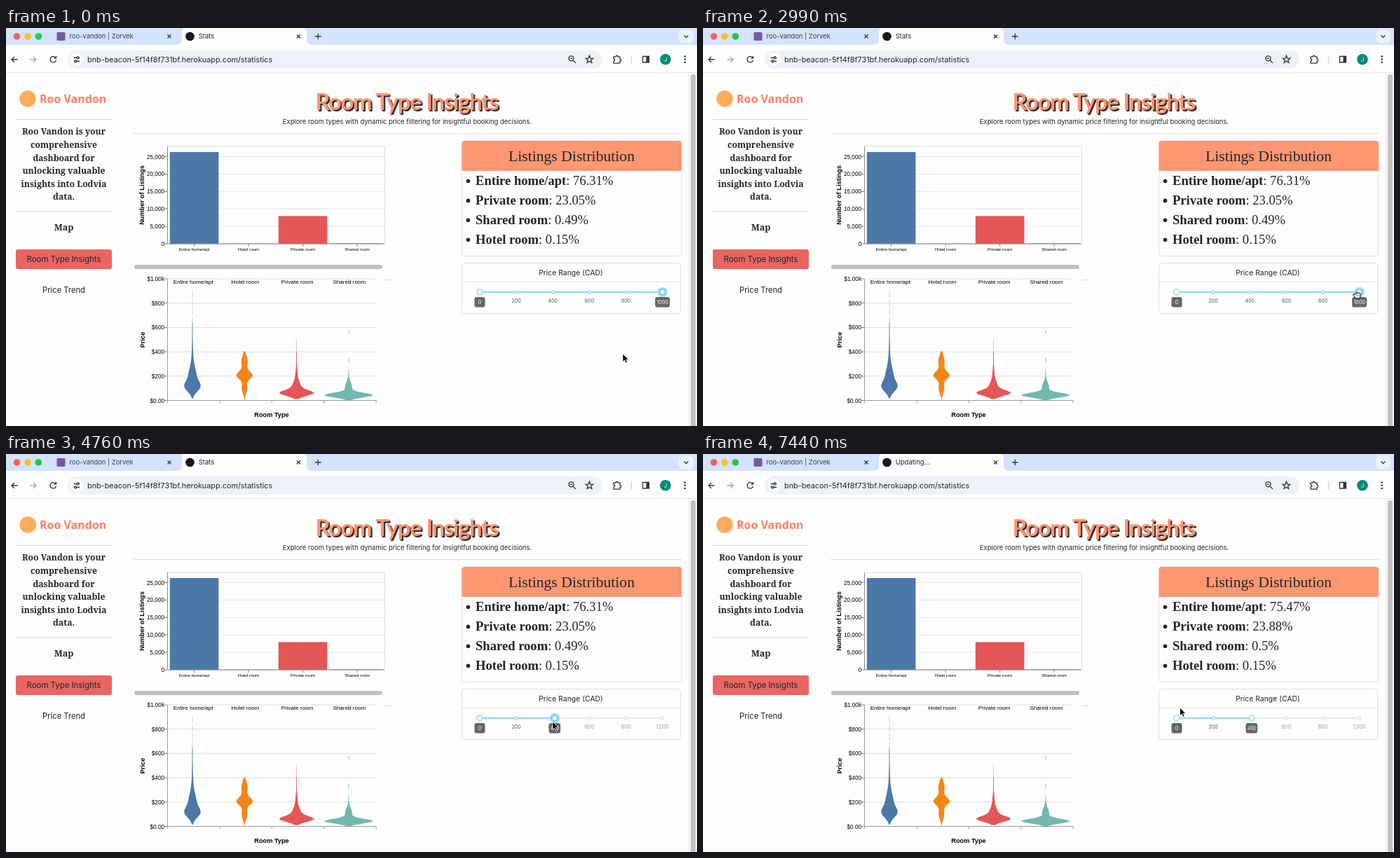
An HTML page that plays this animation: 986x568 px, repeating every 8000 ms.

```html
<!DOCTYPE html>
<html lang="en">
<head>
<meta charset="utf-8">
<title>Stats</title>
<style>
html, body { margin: 0; height: 100%; overflow: hidden; background: #fdfdfd; }
svg { display: block; width: 100%; height: 100%; font-family: Inter, sans-serif; fill: #212529; }
.arial { font-family: "Liberation Sans", Arial, sans-serif; fill: #000; }
.times { font-family: "Liberation Serif", "Times New Roman", serif; }
.slab { font-family: "Noto Serif", serif; font-weight: 600; }
.brand { font-family: "Open Sans", sans-serif; font-weight: 700; fill: #ff7f66; }
.title { font-family: Lato, sans-serif; font-weight: 700; fill: #ff9472; letter-spacing: -1.1px; text-shadow: 2px 2px 1px #222; }
.bold { font-weight: 700; }
.white { fill: #fff; }
.icon { fill: none; stroke: #333; stroke-width: 1.3; }
.hand { fill: #fff; stroke: #000; stroke-linejoin: round; }
</style>
</head>
<body>
<svg id="stage" viewBox="0 0 986 568"></svg>
<script>
const BLUE = '#4c78a8', ORANGE = '#f58518', RED = '#e45756', TEAL = '#72b7b2', SKY = '#96dbfa';
const rooms = ['Entire home/apt', 'Hotel room', 'Private room', 'Shared room'];

const text = (x, y, size, str, cls = '', anchor = 'middle', extra = '') =>
  `<text x="${x}" y="${y}" font-size="${size}" class="${cls}" text-anchor="${anchor}" ${extra}>${str}</text>`;
const upright = (x, y, size, str) =>
  text(0, 0, size, str, 'arial bold', 'middle', `transform="translate(${x} ${y}) rotate(-90)"`);
const rect = (x, y, w, h, fill, r = 0, extra = '') =>
  `<rect x="${x}" y="${y}" width="${w}" height="${h}" rx="${r}" fill="${fill}" ${extra}/>`;
const circle = (x, y, r, fill, extra = '') => `<circle cx="${x}" cy="${y}" r="${r}" fill="${fill}" ${extra}/>`;
const line = (d, color = '#ddd', width = 1, extra = '') =>
  `<path d="${d}" fill="none" stroke="${color}" stroke-width="${width}" ${extra}/>`;
const icon = (d, color = '#333') => `<path class="icon" d="${d}" style="stroke:${color}"/>`;
const repeat = (n, draw) => Array.from({ length: n }, (_, i) => draw(i)).join('');

function browser() {
  const close = x => icon(`M${x - 2.5} 9.5l5 5m0-5l-5 5`);
  const star = repeat(10, i => {
    const r = i % 2 ? 2.4 : 5.6, a = (i / 5 - .5) * Math.PI;
    return `${i ? 'L' : 'M'}${832.5 + r * Math.cos(a)} ${45 + r * Math.sin(a)}`;
  });
  return rect(0, 0, 986, 24, '#d3e3fd') +
    ['#fe5f57', '#febc2e', '#28c840'].map((c, i) => circle(15.5 + i * 15.4, 12, 4.8, c)).join('') +
    '<path d="M243 24q8 0 8-8V6q0-6 6-6H423q6 0 6 6V16q0 8 8 8z" fill="#fdfdfd"/>' +
    rect(72.5, 6, 12, 12, '#79589f', 1.5) + text(90.5, 15.2, 9.4, 'roo-vandon | Zorvek', '', 'start', 'opacity=".85"') +
    circle(262.5, 12, 6.3, '#17171c') + text(274.7, 15.2, 9.5, '', '', 'start', 'id="tab"') +
    close(233) + close(417.5) + icon('M441 12h8.5m-4.2-4.2v8.5') +
    rect(960, 2, 21, 20, '#ebf2fe', 7) + icon('M967.5 10.5l3 3 3-3') +
    line('M0 63.5H986', '#e0e4ea') +
    icon('M16.5 45H8m4-4l-4 4 4 4') + icon('M34.5 45H43m-4-4l4 4-4 4', '#a5a8ad') +
    icon('M71 42.5a4.3 4.3 0 1 0 .5 3.5M71.5 40v3.2h-3.2') +
    rect(88, 32, 763, 25.5, '#edf1fa', 12.7) + circle(101, 45, 9, '#fdfdfd') +
    icon('M96.500 42.5h4.500m3 0h1M96.500 47.5h1m3 0h4.500') +
    circle(102.7, 42.5, 1.5, 'none', 'class="icon"') + circle(99.3, 47.5, 1.5, 'none', 'class="icon"') +
    text(116, 49, 10.85, 'bnb-beacon-5f14f8f731bf.herokuapp.com/statistics', '', 'start') +
    circle(806.5, 43.3, 3.5, 'none', 'class="icon"') + icon('M809 46l4 4M804.8 43.3h3.4') + icon(star + 'z') +
    icon('M867 41.2h3a1.7 1.7 0 0 1 3.4 0h2.6v3a1.7 1.7 0 0 1 0 3.4v2.6h-9v-3a1.7 1.7 0 0 0 0-3.4z') +
    line('M892.5 39v12', '#c9dbf8', 1.5) + icon('M908.5 40.5h9v8.5h-9z') + rect(913.5, 40.5, 4.5, 8.5, '#333') +
    circle(941, 44.8, 7.8, '#00897b') + text(941, 47.8, 8, 'J', 'white') +
    repeat(3, i => circle(968.7, 40.6 + i * 4.2, 1.3, '#333')) +
    rect(974.5, 64, 12, 504, '#fafafa') + line('M974.5 64V568', '#e8e8e8') + rect(977, 66, 7, 520, '#c1c1c1', 3.5);
}

function sidebar() {
  const intro = ['Roo Vandon is your', 'comprehensive', 'dashboard for', 'unlocking valuable', 'insights into Lodvia', 'data.'];
  return circle(31, 101, 11.8, '#ffab5e') + text(48, 107, 16, 'Roo Vandon', 'brand', 'start') +
    line('M14 130.5H151M14 262H151', '#d5d5d5') +
    intro.map((s, i) => text(82.5, 152.3 + i * 18.6, 12.2, s, 'slab')).join('') +
    text(82.5, 289.3, 12.6, 'Map', 'slab') +
    rect(14, 316, 137, 28, '#ea6561', 3) + text(82.5, 334.3, 11.4, 'Room Type Insights') +
    text(82.5, 377.8, 11.2, 'Price Trend');
}

const heading = () => text(572, 116.5, 32.5, 'Room Type Insights', 'title') +
  text(572.5, 136.8, 9.45, 'Explore room types with dynamic price filtering for insightful booking decisions.') +
  line('M182 150.5H964');

function barChart() {
  const y = count => 308 - count * .00498;
  const bars = [[26300, BLUE], [50, ORANGE], [7950, RED], [170, TEAL]];
  return rect(230.5, 169, 310, 139, 'none', 0, 'stroke="#ddd"') +
    repeat(6, k => line(`M230 ${y(k * 5000)}H540`, '#e6e6e6') + line(`M226 ${y(k * 5000)}h4`, '#888') +
      text(226, y(k * 5000) + 3, 8.2, (k * 5000).toLocaleString('en-US'), 'arial', 'end')) +
    bars.map(([count, color], i) => {
      const x = 268.6 + i * 77.5;
      return rect(x - 34.8, y(count), 69.6, 308 - y(count), color) + line(`M${x} 308v4`, '#888') +
        text(x, 318, 6.2, rooms[i], 'arial');
    }).join('') +
    line('M230.5 169V308H540', '#888') + upright(197, 238.5, 9.3, 'Number of Listings') +
    rect(183, 338, 354, 6, '#c1c1c1', 3);
}

const priceY = price => 531.5 - price * .1735;

// Density as a sum of bumps: [half-width, price, spread].
function violin(cx, color, low, high, bumps) {
  const half = p => bumps.reduce((sum, [a, m, s]) => sum + a * Math.exp(-(((p - m) / s) ** 2)), 0);
  let right = '', left = '';
  for (let p = low; p <= high; p += 4) {
    right += `${cx + half(p)},${priceY(p)} `;
    left = `${cx - half(p)},${priceY(p)} ` + left;
  }
  return `<polygon points="${right + left}" fill="${color}"/>`;
}

function violinChart() {
  const outliers = (x, from, to, color, opacity, dash = '') =>
    line(`M${x} ${priceY(from)}V${priceY(to)}`, color, 1, `opacity="${opacity}" stroke-dasharray="${dash}"`);
  return repeat(6, k => {
    const y = priceY(k * 200);
    return line(`M230 ${y}H528`) + line(`M226 ${y}h4`, '#888') +
      text(226, y + 3, 8.2, k < 5 ? '$' + (k * 200 || '0.00') : '$1.00k', 'arial', 'end');
  }) +
    repeat(5, i => line(`M${230.5 + i * 74.4} 531v4`, '#999')) + line('M230.5 358V531.5H528', '#999') +
    outliers(266, 640, 920, BLUE, .35, '9 3') + outliers(266, 400, 640, BLUE, .85) +
    violin(266, BLUE, 16, 560, [[9.5, 112, 60], [4.5, 200, 90], [1.5, 300, 150]]) +
    violin(340.3, ORANGE, 4, 406, [[11, 207, 45], [4.5, 320, 70], [4, 100, 60]]) +
    outliers(414.5, 400, 505, RED, .4) + outliers(414.5, 230, 400, RED, .9) +
    violin(414.5, RED, 12, 330, [[20, 60, 32], [6, 100, 65], [1.5, 200, 100]]) +
    outliers(489, 965, 1000, TEAL, .7) + outliers(489, 552, 578, TEAL, .9) + outliers(489, 180, 350, TEAL, .9, '13 10') +
    violin(488.8, TEAL, 3, 215, [[33, 43, 27], [5, 110, 60]]) +
    rooms.map((s, i) => text(267.2 + i * 74.2, 364.8, 8.1, s, 'arial')).join('') +
    text(379, 555, 9.2, 'Room Type', 'arial bold') + upright(198, 445, 9.2, 'Price') +
    repeat(3, i => circle(542 + i * 3.5, 359.5, 1, '#ccc'));
}

function cards() {
  const items = ['Entire home/apt', 'Private room', 'Shared room', 'Hotel room'];
  return rect(650.5, 161, 313.5, 164.5, 'none', 4, 'stroke="#dfdfdf"') +
    '<path d="M650.5 204V165q0-4 4-4H960q4 0 4 4V204z" fill="#ff9773"/>' +
    text(807, 189.5, 21.7, 'Listings Distribution', 'times') +
    items.map((s, i) => circle(659.5, 218.5 + i * 27.9, 2.8, '#212529') +
      text(670, 224 + i * 27.9, 18.6, `<tspan class="bold">${s}</tspan><tspan class="share"></tspan>`, 'times', 'start')).join('') +
    rect(650.5, 335.5, 312, 72, 'none', 4, 'stroke="#dfdfdf"') + line('M650.5 362.5H962.5', '#e2e2e2') +
    text(806, 353.4, 10.4, 'Price Range (CAD)');
}

const sliderX = value => 676 + value * .2607;

function tooltip(value) {
  const x = sliderX(value), w = value < 10 ? 15 : value < 1000 ? 16.5 : 21;
  return rect(x - w / 2, 384, w, 14.5, '#666', 3) + text(x, 393.9, 7.2, value, 'white');
}

function slider(value, focused) {
  const x = sliderX(value);
  const handle = (cx, color = SKY) => circle(cx, 377, 4, '#fff', `stroke="${color}" stroke-width="1.6"`);
  return line('M676 377H936.5', '#e9e9e9', 2.5) + line(`M676 377H${x}`, SKY, 2.5) +
    repeat(6, k => {
      const v = k * 200, on = v <= value;
      return circle(sliderX(v), 377, 2, '#fff', `stroke="${on ? SKY : '#e4e4e4'}" stroke-width="1.3"`) +
        text(sliderX(v), 391.9, 7.2, v.toLocaleString('en-US'), '', 'middle', `style="fill:${on ? '#555' : '#999'}"`);
    }) +
    handle(676) + (focused ? circle(x, 377, 7.3, '#a9e0fa') + handle(x, '#57c2f5') : handle(x)) +
    tooltip(0) + tooltip(value);
}

const hand = (fingers, palm) => '<g class="hand">' +
  `<path d="M-3 ${palm - 2}l-2.500-3q0-2 2.500-.5V${fingers + 1}a1 1 0 0 1 2 0v-1a1 1 0 0 1 2 0a1 1 0 0 1 2 .5a1 1 0 0 1 2 1V1l-1.500 ${palm - 1}h-5z"/>` +
  `<path d="M-1 ${fingers + 2}V0m2-1.500V0m2-1.500V0" stroke-width=".7"/></g>`;
const cursors = {
  arrow: '<path d="M0 0V11.5l2.7-2.4 1.9 4.2 2-.9-1.9-4.1H8.3z" fill="#000" stroke="#fff" stroke-width=".8"/>',
  open: hand(-5, 5),
  grab: hand(-3.5, 4)
};

const TICK = 148.5;
const easeIn = p => p ** 5;
const easeOut = p => 1 - (1 - p) ** 2.5;
const easeInOut = p => p * p * (3 - 2 * p);
const progress = (tick, from, to) => Math.min(1, Math.max(0, (tick - from) / (to - from)));
const mix = (a, b, p) => a + (b - a) * p;

const DRAG = [20, 31];
const moves = [
  { ticks: [2, 9], start: [880, 465], end: [935, 380], ease: easeInOut },
  { ticks: DRAG, start: [933, 382], end: [780, 382], ease: easeOut },
  { ticks: [36, 42], start: [780, 384], end: [683, 366], ease: easeIn },
  { ticks: [44, 50], start: [683, 366], end: [680.5, 362], ease: easeInOut }
];

function pointerAt(tick) {
  const { ticks, start, end, ease } = moves.findLast(m => m.ticks[0] <= tick) || moves[0];
  const p = ease(progress(tick, ...ticks));
  return start.map((s, i) => mix(s, end[i], p));
}

// The handle trails the pointer slightly and snaps to tens.
const valueAt = tick => Math.round(mix(100, 41, easeOut(progress(tick - .75, ...DRAG)))) * 10;

const $ = id => document.getElementById(id);
$('stage').innerHTML = browser() + sidebar() + heading() + barChart() + violinChart() + cards() +
  '<g id="slider"></g><g id="pointer"></g>';
const shares = [...document.querySelectorAll('.share')];
const before = [76.31, 23.05, .49, .15], after = [75.47, 23.88, .5, .15];

function frame(now) {
  const tick = Math.floor(now % 8000 / TICK);
  const released = tick >= 37;
  const kind = tick < 8 || tick >= 32 ? 'arrow' : tick < DRAG[0] ? 'open' : 'grab';
  $('tab').textContent = released ? 'Updating...' : 'Stats';
  shares.forEach((el, i) => el.textContent = `: ${(tick < 39 ? before : after)[i]}%`);
  $('slider').innerHTML = slider(valueAt(tick), !released);
  $('pointer').innerHTML = `<g transform="translate(${pointerAt(tick)})">${cursors[kind]}</g>`;
  requestAnimationFrame(frame);
}
frame(0);
</script>
</body>
</html>
```
